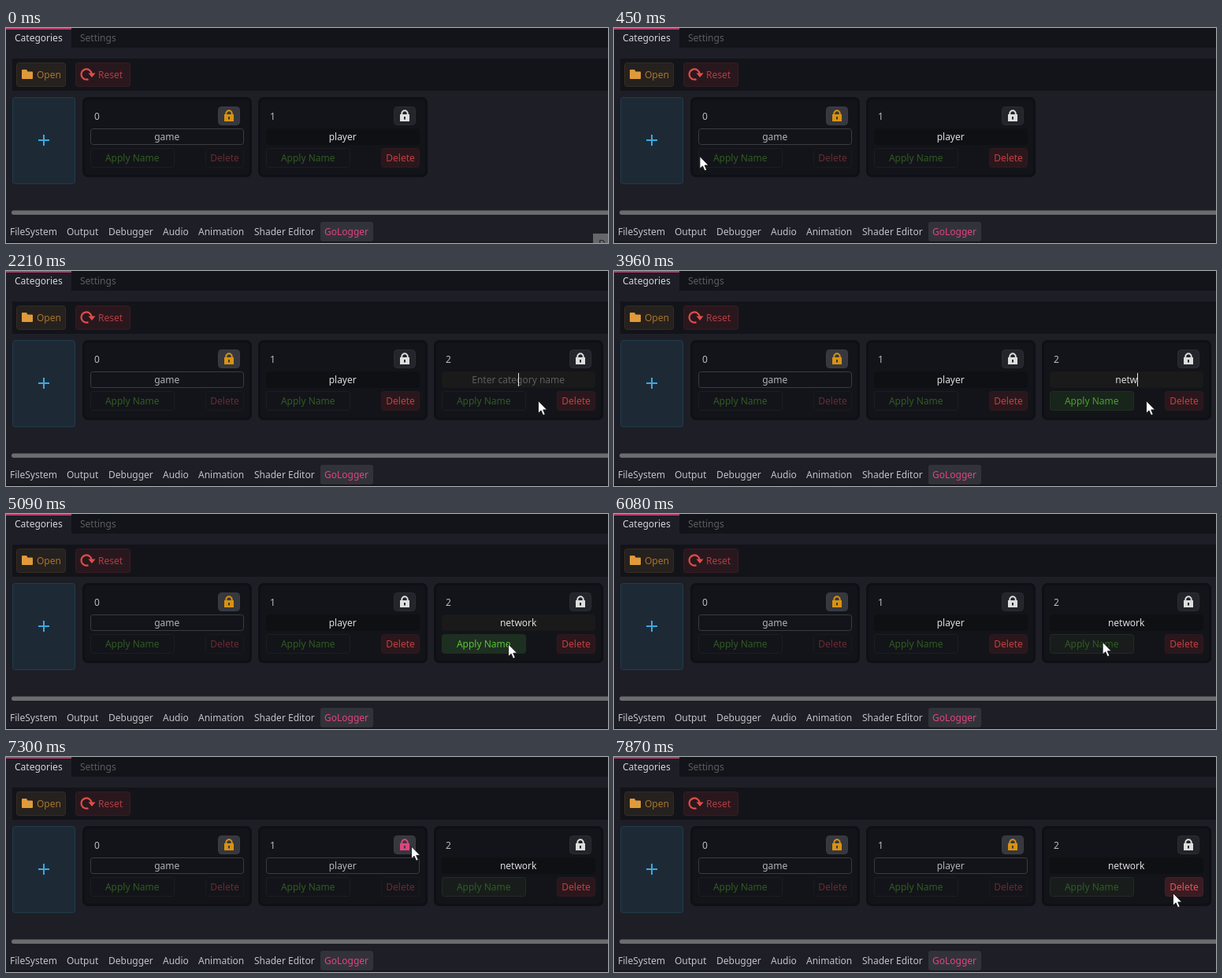
An HTML page that plays this animation: 764 by 274 pixels, repeating every 8000 ms.

```html
<!DOCTYPE html>
<html lang="en">
<head>
<meta charset="utf-8">
<title>Category editor</title>
<style>
  html, body { margin: 0; width: 100%; height: 100%; overflow: hidden; background: #1d1e26; }
  svg { display: block; width: 100vw; height: 100vh; }
  text { font: 12px "Noto Sans", "Open Sans", sans-serif; white-space: pre; }
</style>
</head>
<body>
<svg id="stage" viewBox="0 0 764 274"></svg>
<script>
const LOOP = 8000;
const stage = document.getElementById('stage');
const PINK = '#e0447f', ORANGE = '#d8930f', DARK = '#131419';

function add(tag, attrs, parent = stage) {
  const el = document.createElementNS('http://www.w3.org/2000/svg', tag);
  set(el, attrs);
  parent.appendChild(el);
  return el;
}
function set(el, attrs) {
  for (const k in attrs) el.setAttribute(k, attrs[k]);
}
function show(el, on) {
  el.setAttribute('visibility', on ? 'visible' : 'hidden');
}
// Edges are given as left, top, right, bottom.
function box(l, t, r, b, fill, stroke, rx = 0, parent = stage) {
  const d = stroke ? 0.5 : 0;
  return add('rect', {
    x: l + d, y: t + d, width: r - l - 2 * d, height: b - t - 2 * d,
    rx, fill, stroke: stroke || 'none'
  }, parent);
}
function label(x, y, str, fill, anchor = 'start', parent = stage) {
  const el = add('text', { x, y, fill, 'text-anchor': anchor }, parent);
  el.textContent = str;
  return el;
}

// Tabs and toolbar
box(0, 0, 764, 25, DARK);
box(0, 0, 83, 25, '#1d1e26');
box(0, 0, 83, 2, '#b53a68');
label(11, 17, 'Categories', '#d6d6d9');
label(94, 17, 'Settings', '#5c5d63');
box(8, 39, 764, 80, DARK);
box(13, 44, 76, 75, '#25211f', '#352c22', 3);
add('path', { d: 'M20 54q0-1 1-1h5l1.5 2.5H33q1 0 1 1V64q0 1-1 1H21q-1 0-1-1Z', fill: '#e09a3a' });
label(39, 64, 'Open', '#a9742b');
box(88, 44, 158, 75, '#28181e', '#371c23', 3);
add('path', { d: 'M104.5 65.2A6.6 6.6 0 1 1 108.6 58', fill: 'none', stroke: '#e04e4a', 'stroke-width': 2.2 });
add('path', { d: 'M104.5 57.5H113.5L109 63Z', fill: '#e04e4a' });
label(117, 64, 'Reset', '#b03e43');

const plusBox = box(8, 88, 88, 199, '#1d2a36', '#233b4b', 3);
const plus = add('path', { d: 'M48 136V150M41 143H55', stroke: '#3ca9df', 'stroke-width': 2 });

// Bottom bar
const scroll = box(7, 232.5, 770, 238, '#6c6c6f', null, 2.7);
box(399, 247, 466, 272, '#32333a', null, 3);
box(0, 272, 764, 274, '#17181d');
[[5, 'FileSystem'], [77, 'Output'], [130, 'Debugger'], [199, 'Audio'], [244, 'Animation'],
 [315, 'Shader Editor'], [404, 'GoLogger']].forEach(([x, s]) =>
  label(x, 264, s, s === 'GoLogger' ? PINK : '#c3c3c7'));

const tip = add('g', {});
box(745, 262, 764, 274, '#66676b', null, 0, tip);
label(752, 279, 'D', '#26272b', 'start', tip);

function makeCard(i) {
  const g = add('g', { transform: `translate(${97 + 223 * i} 0)` });
  box(0, 88, 215, 190, '#0f1014', null, 7, g);
  box(3, 91, 212, 187, '#131419', null, 5, g);
  label(15, 117, i, '#bcbcc0', 'start', g);
  const lockBox = box(172, 100, 200, 124, '#24252b', '#2c2d33', 4, g);
  const lock = add('g', {}, g);
  add('path', {
    d: 'M180 110H192V119H180ZM185 113V116.5H187V113Z', 'fill-rule': 'evenodd'
  }, lock);
  add('path', { d: 'M182.3 111V109a3.7 3.7 0 0 1 7.4 0V111', fill: 'none', 'stroke-width': 2 }, lock);
  const field = box(10, 128, 205, 149, DARK, DARK, 3, g);
  const name = label(107.2, 143, '', '#d6d6d9', 'middle', g);
  const applyBox = box(10, 153, 117, 178, DARK, '#1d1e23', 3, g);
  const apply = label(63.2, 170, 'Apply Name', '#2f5c22', 'middle', g);
  const delBox = box(156, 153, 205, 178, DARK, DARK, 3, g);
  const del = label(180.6, 170, 'Delete', '#6b2a31', 'middle', g);
  return { g, x: 97 + 223 * i, lockBox, lock, field, name, applyBox, apply, delBox, del };
}
const cards = [0, 1, 2].map(makeCard);
cards[0].name.textContent = 'game';
cards[1].name.textContent = 'player';

const caret = add('path', { stroke: '#e4e4e6' });
const pointer = add('path', {
  d: 'M.5 .5V16.2L4.1 12.9 6.6 18.8 9.2 17.7 6.7 11.9H11.6Z',
  fill: '#fff', stroke: '#111216', 'stroke-width': 0.9
});

// Pointer stops: time, x, y, easing on the way there
const ease = {
  lin: p => p,
  out: p => 1 - (1 - p) ** 3,
  soft: p => 1 - (1 - p) ** 2,
  io: p => p * p * (3 - 2 * p)
};
const route = [
  [40, 750, 285], [770, 50, 152, 'out'], [1210, 50, 152], [1680, 571, 184, 'lin'],
  [1930, 675, 165, 'soft'], [4440, 675, 165], [4560, 703, 167, 'soft'], [4690, 703, 167],
  [5250, 621, 165, 'io'], [5840, 621, 165], [5920, 620, 163, 'lin'], [6060, 620, 163],
  [6690, 512.5, 113, 'io'], [7270, 512.5, 113], [7870, 709, 173, 'io']
];
function pointerAt(t) {
  const i = route.findIndex(k => k[0] > t);
  if (i === 0) return route[0].slice(1, 3);
  if (i < 0) return route[route.length - 1].slice(1, 3);
  const [t0, x0, y0] = route[i - 1], [t1, x1, y1, e = 'lin'] = route[i];
  const p = ease[e]((t - t0) / (t1 - t0));
  return [x0 + (x1 - x0) * p, y0 + (y1 - y0) * p];
}

const CREATED = 1230, PRESSED = 5420, APPLIED = 5540, LOCK_DOWN = 7020, LOCKED = 7150;
const BLINK = 490;
const keys = [3270, 3430, 3550, 3960, 4080, 4180, 4280];

function caretOn(t) {
  if (t < CREATED || t >= PRESSED) return false;
  if (t >= 3140 && t < keys[0]) return true;
  const last = keys.filter(k => k <= t).pop() || CREATED;
  return Math.floor((t - last) / BLINK) % 2 === 0;
}

function drawCard(c, s) {
  const lockColor = s.lockDown || (s.locked && s.lockHover) ? PINK
    : s.locked ? ORANGE : s.lockHover ? '#fff' : '#dededf';
  set(c.lock, { fill: lockColor, stroke: lockColor });
  c.lock.firstChild.setAttribute('stroke', 'none');
  const raised = s.locked || s.lockHover;
  set(c.lockBox, { fill: raised ? '#37383e' : '#24252b', stroke: raised ? '#3c3d43' : '#2c2d33' });

  const fieldFill = s.locked ? DARK : s.focus ? '#1a1a1b' : '#0f1014';
  set(c.field, { fill: fieldFill, stroke: s.locked ? '#3b3c42' : fieldFill });
  c.name.setAttribute('fill', s.hint ? '#5d5d60' : s.locked ? '#b2b2b6' : '#dcdcdf');

  set(c.applyBox, {
    fill: s.canApply ? (s.applyHover ? '#1d2f20' : '#18251b') : s.applied ? '#181d1b' : DARK,
    stroke: s.canApply ? '#1e3020' : s.applied ? '#222b24' : '#1d1e23'
  });
  c.apply.setAttribute('fill', s.canApply ? (s.applyHover ? '#5cc238' : '#4c9f2e') : '#2f5c22');

  set(c.delBox, {
    fill: s.locked ? DARK : s.delHover ? '#3a1c22' : '#2a171c',
    stroke: s.locked ? '#1e181d' : s.delHover ? '#42202a' : '#2f191f'
  });
  c.del.setAttribute('fill', s.locked ? '#6b2a31' : s.delHover ? '#ee514d' : '#c33f42');
}

function draw(t) {
  const [x, y] = pointerAt(t);
  const over = (l, top, r, b) => t >= 40 && x >= l && x < r && y >= top && y < b;

  show(tip, t < 40);
  show(pointer, t >= 40);
  pointer.setAttribute('transform', `translate(${x} ${y})`);

  scroll.setAttribute('fill', over(7, 230, 764, 241) ? '#909093' : '#6c6c6f');
  const onPlus = over(8, 88, 88, 199), down = t >= 910 && t < 1040;
  plusBox.setAttribute('fill', down ? '#243f52' : onPlus ? '#20313f' : '#1d2a36');
  plus.setAttribute('stroke', down ? '#8ad8ff' : onPlus ? '#5cc6fa' : '#3ca9df');

  const typed = 'network'.slice(0, keys.filter(k => k <= t).length);
  const last = cards[2];
  show(last.g, t >= CREATED);
  last.name.textContent = typed || 'Enter category name';

  cards.forEach((c, i) => drawCard(c, {
    locked: i === 0 || (i === 1 && t >= LOCKED),
    lockDown: i === 1 && t >= LOCK_DOWN && t < LOCKED,
    lockHover: over(c.x + 172, 100, c.x + 200, 124),
    focus: i === 2 && t < PRESSED,
    hint: i === 2 && !typed,
    canApply: i === 2 && typed && t < APPLIED,
    applied: i === 2 && t >= APPLIED,
    applyHover: over(c.x + 10, 153, c.x + 117, 178),
    delHover: over(c.x + 156, 153, c.x + 205, 178)
  }));

  show(caret, caretOn(t));
  const half = typed ? last.name.getComputedTextLength() / 2 : 0;
  const cx = Math.floor(650.4 + half) + 0.5;
  caret.setAttribute('d', `M${cx} 130V147`);
}

const start = performance.now();
function tick(now) {
  draw(Math.max(0, now - start) % LOOP);
  requestAnimationFrame(tick);
}
draw(0);
requestAnimationFrame(tick);
</script>
</body>
</html>
```
